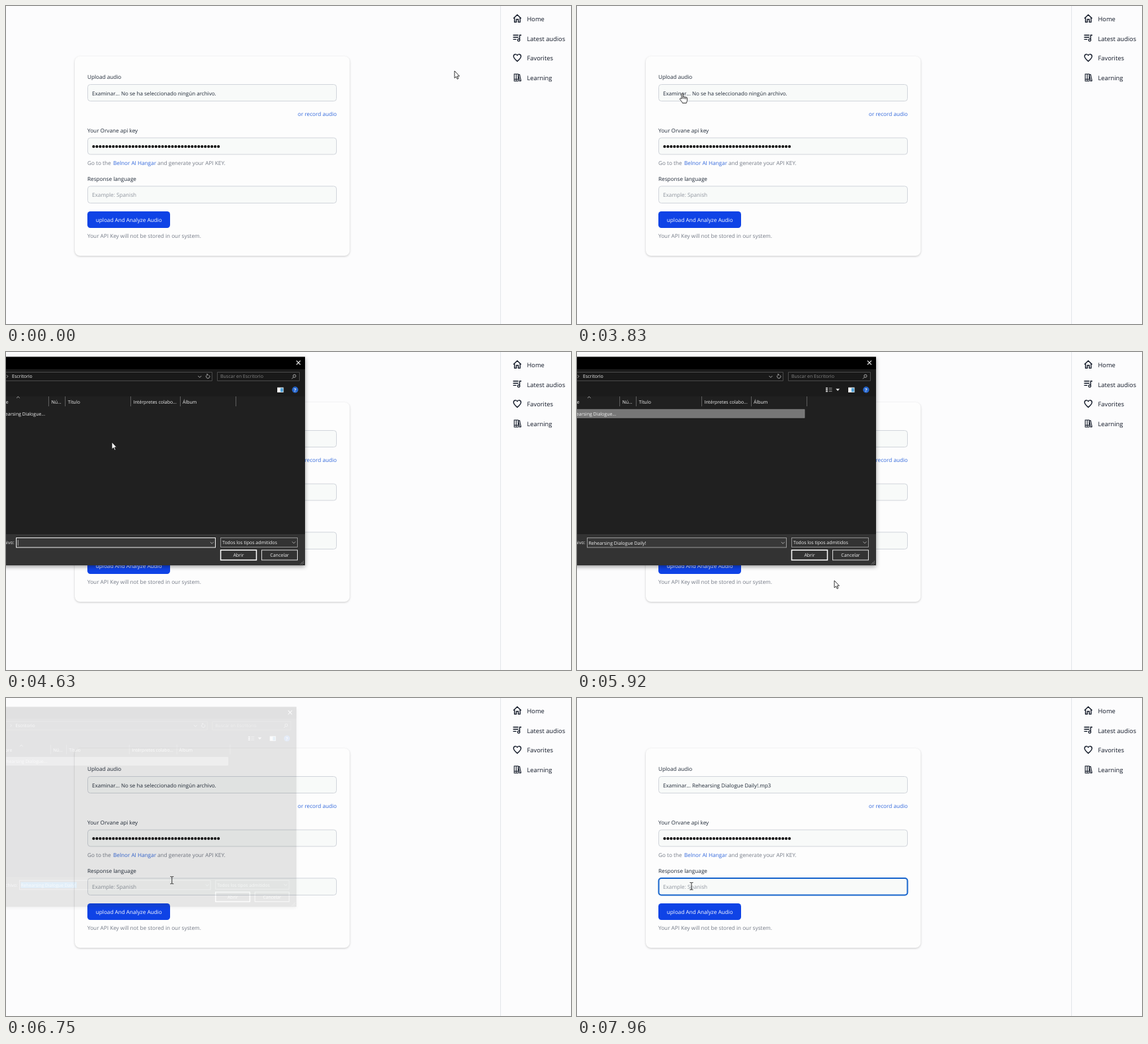
Animation of 854x480 px, one loop 8000 ms. Source, as an HTML page:

```html
<!DOCTYPE html>
<html lang="en">
<head>
<meta charset="utf-8">
<title>Audio upload form</title>
<style>
  html, body { margin: 0; width: 100%; height: 100%; overflow: hidden; background: #fcfcfd; }
  svg { display: block; width: 854px; height: 480px; }
  text { font: 8.2px "Open Sans", "Noto Sans", sans-serif; fill: #1f2937; text-rendering: geometricPrecision; white-space: pre; }
  .card { fill: #fdfdfd; filter: drop-shadow(0 1px 1.5px #0003); }
  .input { fill: #f8faf9; stroke: #d1d5db; }
  .input.focus { stroke: #1664cc; stroke-width: 2; }
  .help { fill: #757b87; }
  .link { fill: #3268dc; }
  .hint { fill: #8f959e; }
  .end { text-anchor: end; }
  .mid { text-anchor: middle; }
  .nav text { font-size: 9.3px; fill: #111827; }
  .nav path { fill: none; stroke: #111827; stroke-width: 1.4; }
  .nav .books { stroke-width: 1.1; }
  #dialog text { font-size: 7px; fill: #f2f2f2; }
  #dialog .dim { fill: #858585; }
  #dialog .line { fill: none; stroke: #b5b5b5; stroke-width: .9; }
  #cursor path { fill: #fff; stroke: #111; stroke-width: .85; stroke-linejoin: round; }
</style>
</head>
<body>
<svg viewBox="0 0 854 480">
  <rect width="854" height="480" fill="#fcfcfd"/>
  <path d="M747.5 0V480" stroke="#e3e5e9"/>

  <g class="nav">
    <path d="M767 18.8 772.8 13.3 778.6 18.8M768.6 17.6V24.4H771.3V20.3H774.3V24.4H777V17.6"/>
    <path d="M766.5 44H774.5M766.5 47.2H774.5M766.5 50.4H771.5M779 44H776.4V51.2"/>
    <circle cx="775" cy="51.4" r="1.7" fill="none" stroke="#111827" stroke-width="1.3"/>
    <path d="M772.8 83.5C768.8 80 767.2 78.3 767.2 76C767.2 72.6 771.1 71.8 772.8 74.5C774.5 71.8 778.4 72.6 778.4 76C778.4 78.3 776.8 80 772.8 83.5Z"/>
    <path class="books" d="M768.2 102.8H771.2V113.3H768.2ZM771.2 102.8H774.2V113.3H771.2ZM774.4 104 776.4 103.5 778.4 112.8 776.4 113.3ZM768 110.5H774.2"/>
    <text x="787.5" y="23">Home</text>
    <text x="787.5" y="52.7">Latest audios</text>
    <text x="787.5" y="82.4">Favorites</text>
    <text x="787.5" y="112.2">Learning</text>
  </g>

  <rect class="card" x="104" y="76" width="415.5" height="301" rx="8"/>
  <text x="123" y="110.2">Upload audio</text>
  <rect class="input" x="123.5" y="118.5" width="376" height="25" rx="4"/>
  <text id="file" x="130" y="134.5" style="font-size:8.07px"></text>
  <text class="link end" x="500" y="166.2">or record audio</text>
  <text x="123" y="191">Your Orvane api key</text>
  <rect class="input" x="123.5" y="199" width="376" height="25" rx="4"/>
  <path d="M132.4 212.2H322" stroke="#111" stroke-width="4.2" stroke-linecap="round" stroke-dasharray="0 4.966"/>
  <text class="help" x="123" y="239.5">Go to the <tspan class="link" x="162">Belnor AI Hangar</tspan><tspan x="229">and generate your API KEY.</tspan></text>
  <text x="123" y="264.2">Response language</text>
  <rect class="input" id="language" x="123.5" y="272" width="376" height="25.5" rx="4"/>
  <text class="hint" x="130" y="288.4">Example: Spanish</text>
  <rect x="123" y="310" width="125" height="25" rx="4.5" fill="#0f43e6"/>
  <text class="mid" x="185.7" y="326" style="fill:#fff">upload And Analyze Audio</text>
  <text class="help" x="123" y="350">Your API Key will not be stored in our system.</text>

  <g id="dialog">
    <rect x="-180" y="7.5" width="632" height="314.5" fill="#202020" style="filter:drop-shadow(0 2px 3px #0006)"/>
    <rect x="-180" y="7.5" width="632" height="18.5" fill="#000"/>
    <rect x="-180" y="26" width="632" height="41" fill="#1b1b1b"/>
    <rect x="-180" y="275" width="632" height="47" fill="#333"/>
    <path d="M439 13.2 445 19.2M445 13.2 439 19.2" stroke="#fff" stroke-width="1.1"/>

    <path d="M-100 30.5H311.5V43.5H-100ZM319.5 30.5H443.5V43.5H319.5Z" fill="#191919" stroke="#505050" stroke-width=".9"/>
    <path class="line" d="M1 34.8 3 36.8 1 38.8M290.3 36 292.8 38.5 295.3 36M307.3 35.3A2.7 2.7 0 1 1 303.8 34.7M303 33.6H305V35.6M434.5 38 432 40.5M16 69.5 18.3 67.3 20.6 69.5"/>
    <circle class="line" cx="436" cy="36.2" r="2.1"/>
    <text x="9" y="39.3">Escritorio</text>
    <text class="dim" x="324" y="39.3">Buscar en Escritorio</text>

    <g id="viewIcon">
      <path d="M376 54.5H379M376 57H379M376 59.5H379" stroke="#eee" stroke-width="1.5"/>
      <path d="M380.5 54.5H385.5M380.5 57H385.5M380.5 59.5H385.5" stroke="#aaa" stroke-width=".8"/>
      <path d="M391.2 55.5H397L394.1 58.8Z" fill="#eee"/>
    </g>
    <rect x="410" y="53.5" width="9.5" height="7.5" fill="#f4f4f4"/>
    <rect x="414.8" y="54.5" width="4" height="5.7" fill="#4a9fd8"/>
    <circle cx="437" cy="57" r="4.7" fill="#2868cf"/>
    <text class="mid" x="437" y="59.7" style="font-weight:700">?</text>

    <path d="M64.5 67V82M89.5 67V82M188.5 67V82M263.5 67V82M347.5 67V82" stroke="#5e5e5e"/>
    <text class="end" x="3.7" y="77.6">Nombre</text>
    <text x="68.5" y="77.6">Nú...</text>
    <text x="93.5" y="77.6">Título</text>
    <text x="192.5" y="77.6">Intérpretes colabo...</text>
    <text x="267" y="77.6">Álbum</text>
    <rect id="row" x="-100" y="86.8" width="444" height="12.4" fill="#777" stroke="#909090" stroke-width=".7"/>
    <text class="end" x="59" y="95.6">Rehearsing Dialogue...</text>

    <text class="end" x="12.5" y="290.3">Nombre de archivo:</text>
    <rect id="nameBox" x="15.5" y="280.5" width="301" height="14.5" fill="#383838"/>
    <rect id="selection" x="17.5" y="283" width="88" height="9.5" fill="#0a84e0"/>
    <text id="name" x="17.5" y="290.5"></text>
    <path id="caret" d="M18.2 283.5V292.5" stroke="#ddd" stroke-width=".7"/>
    <rect x="324.5" y="280.5" width="116" height="14" fill="#333" stroke="#9b9b9b" stroke-width=".9"/>
    <text x="327" y="290.3">Todos los tipos admitidos</text>
    <path class="line" d="M308.8 286.8 311.3 289.3 313.8 286.8M432.5 286.3 435 288.8 437.5 286.3"/>
    <rect x="324.5" y="299" width="54" height="15" fill="#333" stroke="#fff" stroke-width="1.5"/>
    <rect x="386.5" y="299" width="54" height="15" fill="#333" stroke="#ddd"/>
    <text class="mid" x="351.5" y="309">Abrir</text>
    <text class="mid" x="413.5" y="309">Cancelar</text>
    <path d="M445 320.5 450 315.5M447.5 320.5 450 318" stroke="#aaa" stroke-dasharray="1.2 .8"/>
  </g>

  <g id="cursor">
    <path id="arrow" d="M0 0V10.8L2.5 8.5 4.1 12.3 5.8 11.5 4.2 7.9H7.4Z"/>
    <path id="hand" d="M-.9 8.2V.8C-.9-.6 1.2-.6 1.2.8V5.2C1.4 4.3 3.3 4.4 3.4 5.5C3.8 4.8 5.5 5 5.5 6.1C6 5.5 7.6 5.8 7.6 7V10.4C7.6 12 6.6 12.7 6.4 14.5H.4C.2 12.8-2.2 11-3.4 8.8C-3.9 7.4-2.4 6.7-.9 8.2ZM1.2 5V8.2M3.4 5.5V8.4M5.5 6.1V8.6"/>
    <path id="ibeam" style="fill:none" d="M-2.5-5.4H-.8L0-4.8 .8-5.4H2.5M0-4.8V4.8M-2.5 5.4H-.8L0 4.8 .8 5.4H2.5"/>
  </g>
</svg>
<script>
const LOOP = 8000, OPEN = 4400, PICK = 5120, ACCEPT = 6420, CLOSE = 6600, GONE = 6830, FILLED = 6880, FOCUS = 7450;
const TITLE = 'Rehearsing Dialogue Daily!';
// time, x, y of the pointer; it rests where a place repeats
const PATH = [
  [0, 678, 98], [580, 625, 108], [1250, 625, 108], [2130, 532, 131], [3700, 159, 132],
  [4100, 159, 132], [4600, 160, 136], [4680, 160, 136], [5000, 130, 93], [5200, 130, 93],
  [5900, 389, 345], [5960, 389, 345], [6240, 352, 306], [6480, 352, 306], [6750, 251, 275],
  [7350, 173, 284], [LOOP, 173, 284]
];

const el = id => document.getElementById(id);
const show = (id, on) => { el(id).style.display = on ? '' : 'none'; };
const clamp = (v, max = 1) => Math.max(0, Math.min(max, v));

const speed = (i, axis) => (PATH[i][axis] - PATH[i - 1][axis]) / (PATH[i][0] - PATH[i - 1][0]);

// Speed at a key: passes through smoothly, stops at turns and rests
function keySpeed(i, axis) {
  if (i < 1 || i > PATH.length - 2) return 0;
  const a = speed(i, axis), b = speed(i + 1, axis);
  return a * b > 0 ? 2 * a * b / (a + b) : 0;
}

function pointerAt(t) {
  const i = PATH.findIndex(key => key[0] > t);
  const from = PATH[i - 1], to = PATH[i], span = to[0] - from[0];
  const p = (t - from[0]) / span, q = 1 - p;
  return [1, 2].map(axis =>
    q * q * (1 + 2 * p) * from[axis] + p * p * (1 + 2 * q) * to[axis] +
    span * p * q * (q * keySpeed(i - 1, axis) - p * keySpeed(i, axis)));
}

function cursorShape(x, y, modal) {
  if (modal) return 'arrow';
  if (y > 118 && y < 144 && x > 124 && x < 171) return 'hand';
  return x > 123 && x < 500 && y > 271 && y < 298 ? 'ibeam' : 'arrow';
}

function drawDialog(t) {
  show('dialog', t >= OPEN && t < GONE);
  const away = t < CLOSE ? 1 - clamp((t - OPEN) / 190) : clamp((t - CLOSE) / 167, .895);
  el('dialog').setAttribute('opacity', 1 - away);
  el('dialog').setAttribute('transform', `translate(136 154) scale(${1 - .046 * away}) translate(-136 -154)`);
  const picked = t >= PICK;
  show('viewIcon', picked);
  show('row', picked);
  show('caret', !picked);
  show('selection', t >= ACCEPT);
  el('name').textContent = picked ? TITLE : '';
  el('nameBox').setAttribute('stroke', picked ? '#9a9a9a' : '#f0f0f0');
}

function draw() {
  const t = performance.now() % LOOP;
  const [x, y] = pointerAt(t);
  const shape = cursorShape(x, y, t >= OPEN && t < CLOSE);
  el('cursor').setAttribute('transform', `translate(${x} ${y})`);
  for (const id of ['arrow', 'hand', 'ibeam']) show(id, id === shape);
  el('file').textContent = 'Examinar... ' + (t < FILLED ? 'No se ha seleccionado ningún archivo.' : TITLE + '.mp3');
  el('language').classList.toggle('focus', t >= FOCUS);
  drawDialog(t);
  requestAnimationFrame(draw);
}
draw();
</script>
</body>
</html>
```
